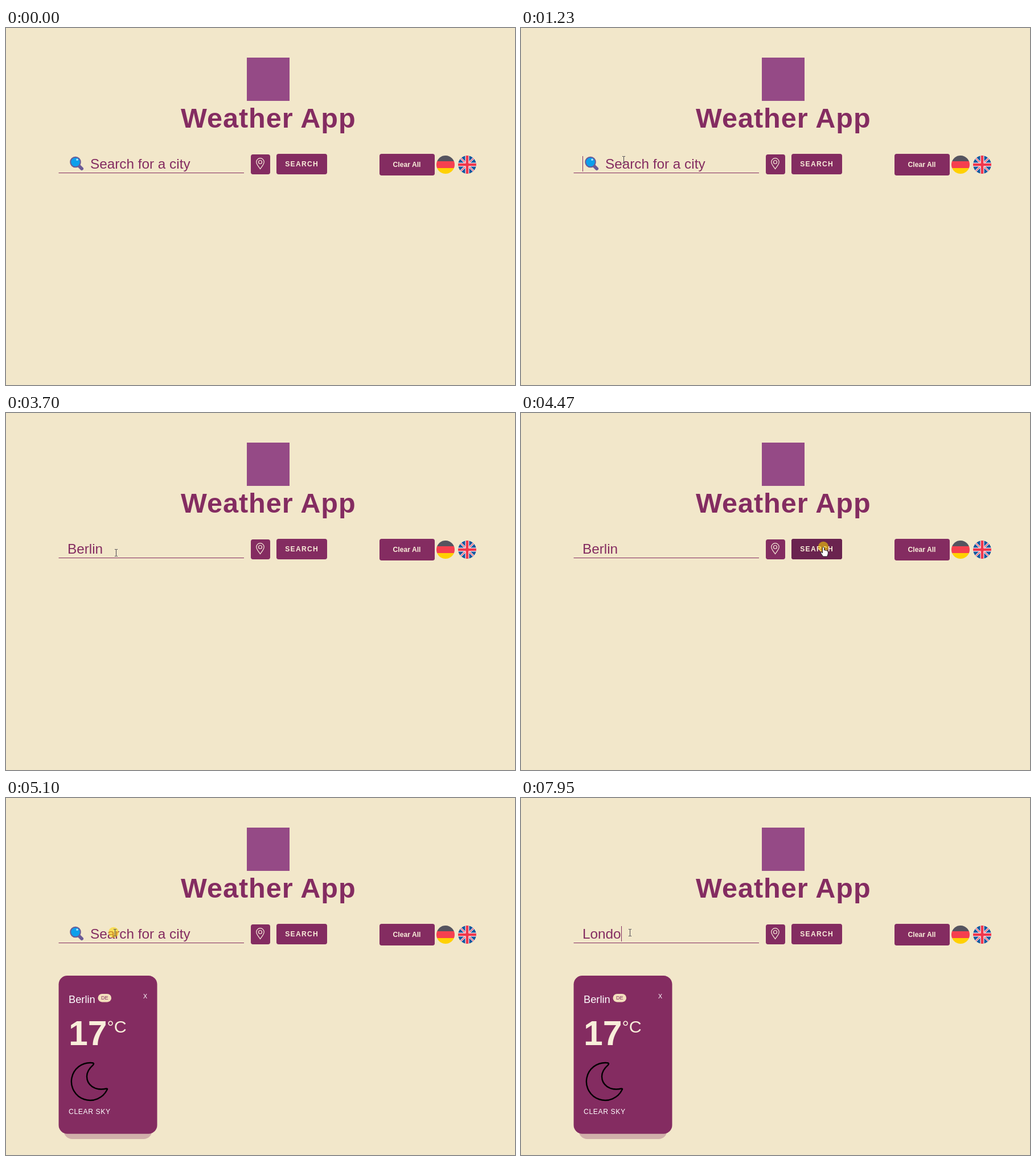
These frames come from a looping animation (894x627 px, 8000 ms). An HTML page:

```html
<!DOCTYPE html>
<html lang="en">
<head>
<meta charset="utf-8">
<title>Weather App</title>
<style>
  html, body { margin: 0; width: 100%; height: 100%; overflow: hidden; background: #f2e7ca; }
  svg { display: block; width: 894px; height: 627px; font-family: "Liberation Sans", Arial, sans-serif; }
  .purple { fill: #842c61; }
  .cream { fill: #f9eeda; }
  .hover { fill: #6a234f; opacity: 0; }
  .bold { font-weight: bold; }
  .field { font-size: 24.3px; }
  .button { font-size: 12.16px; font-weight: bold; }
  .outline { fill: #fff; stroke: #222; stroke-width: 1; stroke-linejoin: round; }
</style>
</head>
<body>
<svg viewBox="0 0 894 627">
  <defs>
    <clipPath id="disc"><circle r="16"/></clipPath>
  </defs>

  <rect x="423" y="52" width="75" height="76" fill="#954a86"/>
  <text class="purple bold" x="307" y="175.3" font-size="48.6" letter-spacing=".97">Weather App</text>

  <!-- search field -->
  <rect class="purple" x="92.5" y="254" width="325.5" height="1"/>
  <g id="placeholder">
    <path d="M129 243L133 247" stroke="#6b5a96" stroke-width="6" stroke-linecap="round"/>
    <circle cx="122" cy="235.5" r="8.8" fill="#0c9fec" stroke="#6b5a96" stroke-width="2"/>
    <circle cx="125" cy="231.3" r="1.7" fill="#b5e4fb"/>
    <text class="purple field" x="148" y="247">Search for a city</text>
  </g>
  <text id="typed" class="purple field" x="108" y="247"></text>
  <rect id="caret" class="purple" y="225" width="1" height="27"/>

  <!-- buttons -->
  <rect class="purple" x="430" y="222" width="34" height="35" rx="3.8"/>
  <rect id="locateHover" class="hover" x="430" y="222" width="34" height="35" rx="3.8"/>
  <g fill="none" stroke="#f9eeda" stroke-width="1.2">
    <path d="M446.5 247.5C444 243.5 439.8 240 439.8 235.3A6.7 6.7 0 0 1 453.2 235.3C453.2 240 449 243.5 446.5 247.5Z"/>
    <circle cx="446.5" cy="235.5" r="3"/>
  </g>
  <rect class="purple" x="475" y="221" width="89" height="36" rx="3.8"/>
  <rect id="searchHover" class="hover" x="475" y="221" width="89" height="36" rx="3.8"/>
  <text class="cream button" x="490.3" y="243" letter-spacing="1.22">SEARCH</text>
  <rect class="purple" x="656" y="221" width="97" height="38" rx="3.8"/>
  <text class="cream button" x="704" y="244" text-anchor="middle">Clear All</text>

  <!-- language flags -->
  <g transform="translate(772 240)" clip-path="url(#disc)">
    <rect x="-16" y="-16" width="32" height="10" fill="#55545f"/>
    <rect x="-16" y="-6" width="32" height="12" fill="#f5404f"/>
    <rect x="-16" y="6" width="32" height="10" fill="#ffd100"/>
  </g>
  <g transform="translate(810 240)" clip-path="url(#disc)">
    <circle r="16" fill="#1559a0"/>
    <path d="M-16-16L16 16M16-16L-16 16" stroke="#f4eef2" stroke-width="3.4"/>
    <path d="M-16-16L16 16M16-16L-16 16" stroke="#f0364b" stroke-width="1.2"/>
    <path d="M0-16V16M-16 0H16" stroke="#f4eef2" stroke-width="7"/>
    <path d="M0-16V16M-16 0H16" stroke="#f0364b" stroke-width="4.6"/>
  </g>

  <!-- weather card -->
  <g id="card">
    <rect class="purple" x="101.2" y="561" width="155.6" height="38" rx="15.2" opacity=".3"/>
    <rect class="purple" x="92.5" y="312" width="173" height="277.7" rx="15.2"/>
    <text x="110" y="360" font-size="18.24" fill="#fff">Berlin</text>
    <rect x="161.5" y="344" width="23.5" height="14.4" rx="7.2" fill="#f3dfbd"/>
    <text class="purple" x="173.3" y="354.3" font-size="9.1" text-anchor="middle">DE</text>
    <text x="244.5" y="352" font-size="10.6" fill="#fff" text-anchor="middle">X</text>
    <text class="cream bold" x="110" y="433.5" font-size="60.8">17</text>
    <text class="cream" x="177.6" y="412" font-size="30.4">°C</text>
    <path d="M150 465A33 33 0 1 0 177.6 512.3Q179 510 176 510.5C155 515 142 503 142 489C142 481 147 474 153 468.8Q156 465 150 465Z"
          fill="none" stroke="#000" stroke-width="2.4"/>
    <text x="110" y="555" font-size="12.16" letter-spacing=".61" fill="#fff">CLEAR SKY</text>
  </g>

  <!-- mouse -->
  <g id="mouse">
    <circle id="click" r="9.2" fill="#ffd800" opacity=".56"/>
    <path id="arrow" class="outline" d="M.5.5V13.5L3.4 10.8L5.4 15.6L7.6 14.6L5.6 10H9.5Z"/>
    <path id="beam" d="M0-5.5H2.2M2.8-5.5H5M2.5-5V6M0 6.5H2.2M2.8 6.5H5" fill="none" stroke="#4a4650" stroke-width="1"/>
    <path id="hand" class="outline" stroke-width=".8"
          d="M-1.5 1.5Q0-.8 1.5 1.5V6Q3 5 4 6.5Q5.5 5.6 6.3 7.2Q8.3 6.8 8.3 9V12.5L6.8 17H-.5L-4.6 10.8Q-5 8.6-3 9.2L-1.5 11Z"/>
  </g>
</svg>

<script>
const LOOP = 8000, STEP = 70, BLINK = 530;
const el = Object.fromEntries([...document.querySelectorAll("[id]")].map(e => [e.id, e]));

// [time, field text]; null means the field has no focus
const edits = [
  [0, null], [1100, ""], [2160, "B"], [2560, "Ber"], [2760, "Berl"], [3020, "Berli"], [3100, "Berlin"],
  [4540, null], [5170, ""], [6890, "L"], [7150, "Lo"], [7480, "Lon"], [7750, "Lond"], [7950, "Londo"]
];
const clicks = [[1100, 1230], [4400, 4540], [5100, 5240]];
const route = [
  [120, 732, 597], [330, 490, 525], [540, 200, 330], [680, 137, 268], [820, 147, 248], [960, 170, 234],
  [1030, 178, 231], [3630, 178, 231], [3770, 208, 264], [3910, 330, 283], [4050, 470, 263],
  [4180, 524, 238], [4250, 531, 235], [4460, 531, 235], [4530, 529, 237], [4680, 455, 242],
  [4880, 275, 240], [5090, 189, 236]
];

const clamp = v => Math.max(0, Math.min(1, v));
const show = (e, on) => e.style.display = on ? "" : "none";
const fade = (t, from, to) => clamp((t - from) / 300) - clamp((t - to) / 300);

function mouseAt(t) {
  // pointer positions are refreshed on a fixed step
  const time = Math.floor((t - 50) / STEP) * STEP + 50;
  const next = route.findIndex(p => p[0] > time);
  if (next < 0) return route.at(-1).slice(1);
  if (next === 0) return route[0].slice(1);
  const [a, b] = [route[next - 1], route[next]];
  const k = (time - a[0]) / (b[0] - a[0]);
  return [a[1] + (b[1] - a[1]) * k, a[2] + (b[2] - a[2]) * k];
}

function drawField(t) {
  const [since, text] = edits.findLast(e => e[0] <= t);
  el.typed.textContent = text || "";
  show(el.placeholder, !text);
  const focused = text !== null && !(t >= 4400 && t < 5170);
  show(el.caret, focused && Math.floor((t - since) / BLINK) % 2 === 0);
  el.caret.setAttribute("x", Math.round(108 + (text ? el.typed.getComputedTextLength() : 0)));
}

function drawMouse(t) {
  const [x, y] = mouseAt(t);
  const overField = x > 92 && x < 418 && y > 222 && y < 255;
  const overButton = y > 221 && y < 257.5 && (x > 429 && x < 464 || x > 475 && x < 564);
  show(el.mouse, t >= 130);
  el.mouse.setAttribute("transform", `translate(${Math.round(x)} ${Math.round(y)})`);
  show(el.beam, overField);
  show(el.hand, overButton);
  show(el.arrow, !overField && !overButton);
  show(el.click, clicks.some(([from, to]) => t >= from && t < to));
}

function draw(now) {
  const t = now % LOOP;
  drawField(t);
  drawMouse(t);
  el.searchHover.style.opacity = fade(t, 4060, 4650);
  el.locateHover.style.opacity = fade(t, 4670, 4720);
  show(el.card, t >= 4540);
  requestAnimationFrame(draw);
}
draw(performance.now());
</script>
</body>
</html>
```
